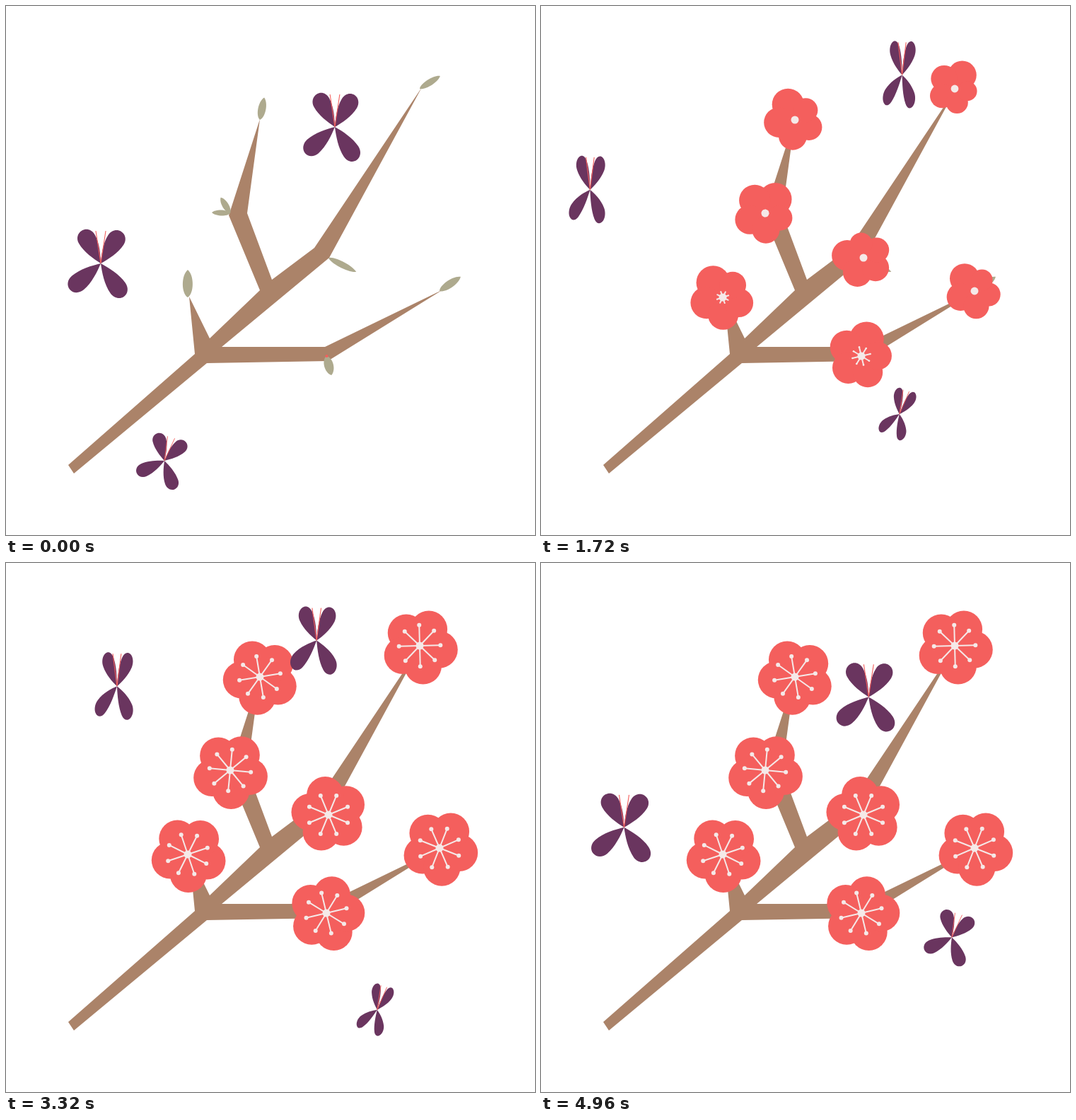
An HTML page with a canvas for the animation above (5000 ms loop, 748x748 px).

```html
<!DOCTYPE html>
<html>
<head>
<meta charset="utf-8">
<title>Blossoming branch</title>
<style>
html, body { margin: 0; width: 100%; height: 100%; overflow: hidden; background: #fff; }
canvas { display: block; width: 748px; height: 748px; }
</style>
</head>
<body>
<canvas id="stage" width="748" height="748"></canvas>
<script>
const SIZE = 748, LOOP = 5000, STEP = 40, TAU = Math.PI * 2, DEG = Math.PI / 180;
const ctx = document.getElementById('stage').getContext('2d');
const BARK = '#ab8369', LEAF = '#aeaa8e', PETAL = '#f45f5d', STAMEN = '#f5e9e8', WING = '#6a355f';

const branch = new Path2D(`M88 649 L267 492 L259 411 L288 470 L359 402 L315 296 L359 160 L341 293
  L376 387 L436 342 L588 115 L457 356 L305 482 L451 482 L618 401 L455 502 L284 505 L96 661 Z`);

// In order of opening; each leaf is length, angle, width
const flowers = [
  { x: 453, y: 495, angle: 285, leaves: [[28, 75, 13]] },
  { x: 257, y: 412, angle: 235, leaves: [[39, -90, 14]] },
  { x: 317, y: 293, angle: 304, leaves: [[26, 239, 9], [26, 182, 8]] },
  { x: 359, y: 161, angle: 244, leaves: [[32, -79, 11]] },
  { x: 456, y: 356, angle: 186, leaves: [[44, 27, 9]] },
  { x: 613, y: 403, angle: 230, leaves: [[36, -34, 11]] },
  { x: 585, y: 117, angle: 297, leaves: [[34, -32, 9]] }
];

// Waypoints are evenly spaced in time over the loop
const butterflies = [
  { scale: 1, turn: 0, phase: 0, path: [[134, 364], [93, 332], [60, 285], [97, 223],
    [148, 180], [155, 182], [126, 255], [117, 381]] },
  { scale: 1, turn: 0, phase: 0.1, path: [[465, 171], [501, 141], [523, 106], [482, 90],
    [445, 88], [440, 124], [452, 163], [464, 191]] },
  { scale: 0.75, turn: 16, phase: -0.02, path: [[224, 643], [292, 567], [438, 588], [588, 561],
    [577, 603], [504, 637], [530, 586], [584, 526]] }
];

const clamp = v => Math.max(0, Math.min(1, v));
const easeInOut = v => (1 - Math.cos(Math.PI * clamp(v))) / 2;
const easeOutBack = v => {
  const p = clamp(v) - 1;
  return 1 + 2.7 * p ** 3 + 1.7 * p ** 2;
};
const polar = (r, deg) => [r * Math.cos(deg * DEG), r * Math.sin(deg * DEG)];

function disc(x, y, r) {
  if (r <= 0) return;
  ctx.beginPath();
  ctx.arc(x, y, r, 0, TAU);
  ctx.fill();
}

function drawLeaf(x, y, [length, angle, width]) {
  const h = width / 1.5;
  ctx.save();
  ctx.translate(x, y);
  ctx.rotate(angle * DEG);
  ctx.fillStyle = LEAF;
  ctx.beginPath();
  for (const side of [-h, h]) {
    ctx.moveTo(0, 0);
    ctx.bezierCurveTo(length * 0.15, side, length * 0.8, side, length, 0);
  }
  ctx.fill();
  ctx.restore();
}

function drawFlower({ x, y, angle }, delay, t) {
  ctx.save();
  ctx.translate(x, y);
  ctx.fillStyle = PETAL;
  disc(0.5, 0, 7 * easeOutBack((t - delay + 130) / 450));
  for (let i = 0; i < 5; i++) {
    const grow = easeInOut((t - delay - 40 - i * 75) / 1900);
    const [px, py] = polar(27.5 * grow ** 0.72, angle - i * 72);
    const [dx, dy] = polar(1.3 * grow, angle + 135);
    disc(px + dx, py + dy, 26.2 * grow);
  }

  ctx.fillStyle = ctx.strokeStyle = STAMEN;
  ctx.lineWidth = 2;
  disc(0, 0, 5.5 * easeInOut((t - 700 - delay * 0.75) / 800));
  const reach = easeInOut((t - 1190 - delay * 1.6) / 800);
  for (let i = 0; i < 8 && reach > 0; i++) {
    const [px, py] = polar(29.3 * reach, angle + 16.5 + i * 45);
    ctx.beginPath();
    ctx.moveTo(0, 0);
    ctx.lineTo(px, py);
    ctx.stroke();
    disc(px, py, 3 * reach);
  }
  ctx.restore();
}

// Smooth curve through the waypoints
function along(path, t) {
  const pos = t / LOOP * (path.length - 1), i = Math.floor(pos), u = pos - i;
  const a = path[i], b = path[i + 1];
  const before = path[i - 1], after = path[i + 2];
  return [0, 1].map(k => {
    const va = before ? (b[k] - before[k]) / 2 : b[k] - a[k];
    const vb = after ? (after[k] - a[k]) / 2 : b[k] - a[k];
    return a[k] + u * (va + u * (3 * (b[k] - a[k]) - 2 * va - vb + u * (2 * (a[k] - b[k]) + va + vb)));
  });
}

// Two mirrored teardrops, squeezed sideways by the flap
function wingPair(tilt, spread, length, flap, up) {
  const w = 12.8, belly = length * 0.74;
  ctx.save();
  ctx.rotate(tilt * DEG);
  ctx.scale(flap, up);
  for (const side of [-1, 1]) {
    ctx.save();
    ctx.rotate(side * spread * DEG);
    ctx.beginPath();
    for (const s of [-w, w]) {
      ctx.moveTo(0, 0);
      ctx.bezierCurveTo(s * 0.45, length * 0.2, s, length * 0.48, s, belly);
      ctx.bezierCurveTo(s, length * 0.89, s * 0.56, length, 0, length);
    }
    ctx.fill();
    ctx.restore();
  }
  ctx.restore();
}

function drawButterfly({ scale, turn, phase, path }, t) {
  const flap = 0.775 + 0.235 * Math.cos(TAU * (t / 1250 + phase));
  const tip = 4 + 3 * flap;
  ctx.save();
  ctx.translate(...along(path, t));
  ctx.rotate(turn * DEG);
  ctx.scale(scale, scale);
  ctx.fillStyle = WING;
  wingPair(1.5, 31, 53.5, flap, -1);
  wingPair(7.5, 42, 57, flap, 1);
  ctx.strokeStyle = PETAL;
  ctx.lineWidth = 1.1;
  ctx.lineJoin = 'bevel';
  ctx.beginPath();
  ctx.moveTo(-tip, -46);
  ctx.lineTo(0, 0);
  ctx.lineTo(tip, -46);
  ctx.stroke();
  ctx.restore();
}

const start = performance.now();
function frame() {
  const elapsed = Math.max(0, performance.now() - start) % LOOP;
  const t = Math.floor(elapsed / STEP) * STEP;
  ctx.fillStyle = '#fff';
  ctx.fillRect(0, 0, SIZE, SIZE);
  ctx.fillStyle = BARK;
  ctx.fill(branch);
  flowers.forEach(f => f.leaves.forEach(leaf => drawLeaf(f.x, f.y, leaf)));
  flowers.forEach((f, i) => drawFlower(f, 100 + i * 48, t));
  butterflies.forEach(b => drawButterfly(b, t));
  requestAnimationFrame(frame);
}
frame();
</script>
</body>
</html>
```
